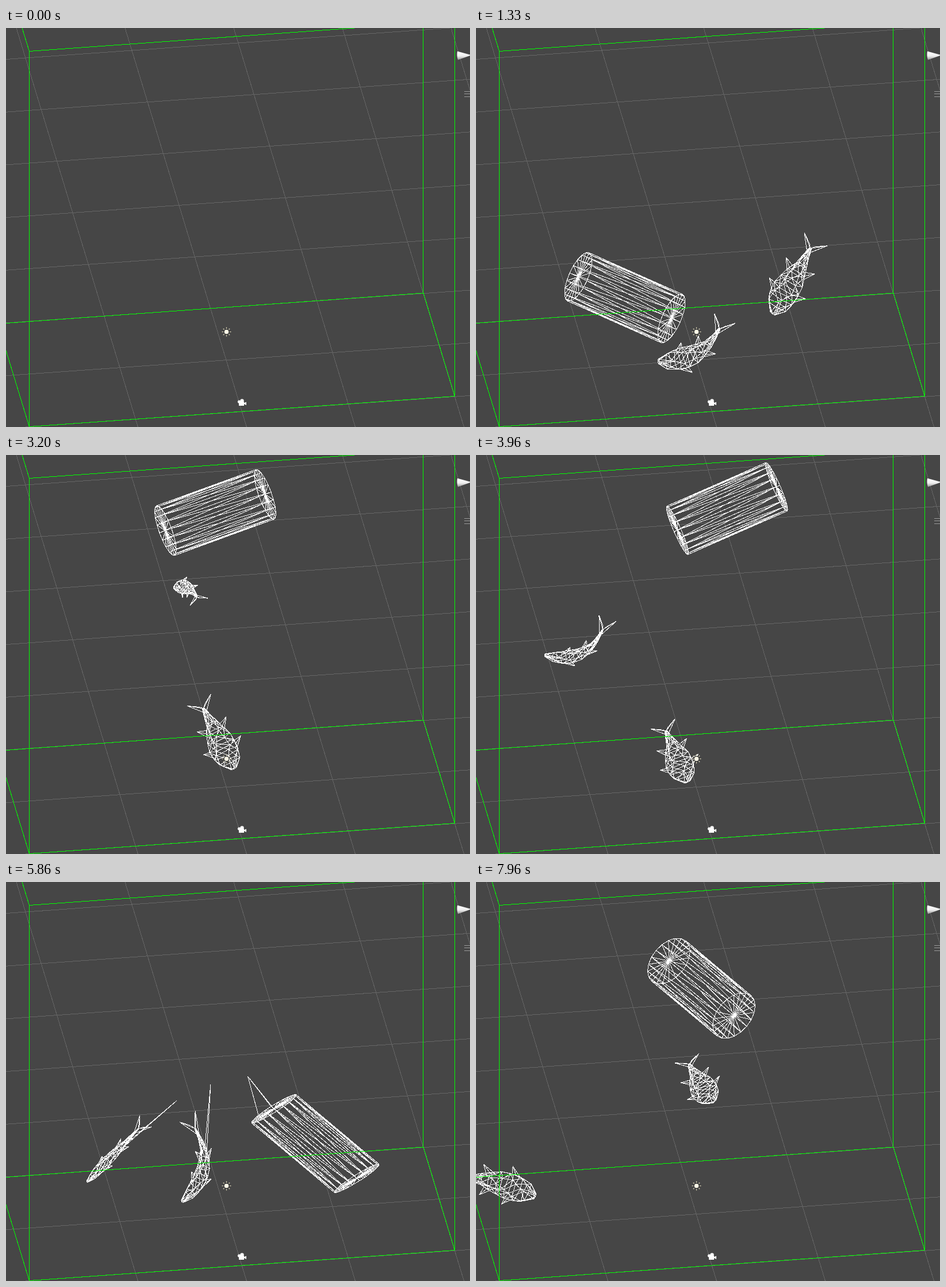
Write an HTML page that moves like this. It is 807 px wide and 694 px high and loops after 8000 ms.

```html
<!DOCTYPE html>
<html lang="en">
<head>
<meta charset="utf-8">
<title>Wireframe box</title>
<style>
html, body { margin: 0; width: 100%; height: 100%; overflow: hidden; background: #464646; }
svg { display: block; width: 100vw; height: 100vh; }
.lines { fill: none; stroke-width: 1; shape-rendering: crispEdges; }
</style>
</head>
<body>
<svg viewBox="0 0 807 694">
  <defs>
    <linearGradient id="cone" x2="0" y2="1">
      <stop offset="0" stop-color="#fff"/><stop offset=".55" stop-color="#eee"/><stop offset="1" stop-color="#999"/>
    </linearGradient>
  </defs>
  <path id="grid" class="lines" stroke="#656565"/>
  <path id="mesh" class="lines" stroke="#fff"/>
  <path class="lines" stroke="#0f0" d="M28 0L40.5 40.5L606 0M40.5 40V693M725.5 0V461M780.5 0V641M0 513.5L726 461L780.5 640.5L40.5 693.5L0 561"/>
  <g transform="translate(383.5 528.5)">
    <circle r="5" fill="#333"/><circle r="3.8" fill="#fffbe6"/>
    <path id="rays" stroke="#e6e0c0" stroke-width="1.2"/>
  </g>
  <path fill="#fff" d="M405 650H414V652L418 650.5V656L414 654V657H405Z"/>
  <g fill="#fff"><circle cx="410.5" cy="648.5" r="3.2"/><circle cx="405.5" cy="650" r="2.6"/></g>
  <path fill="url(#cone)" d="M785 40.5L807 46.5V48L786 55.5Q783.5 48 785 40.5Z"/>
  <path class="lines" stroke="#999" d="M797 110.5H807M797 114.5H807M797 119.5H807"/>
</svg>
<script>
const LOOP = 8000, APPEAR = 60, START = 240, STEP = 63.28;
const TURNS = [26, 47, 70, 89, 102, 122];  // steps at which the bodies change course
const BOUNCE = .35, SWIM_PERIOD = 24, SWIM_PEAK = 17;

// path: x, y, turn, tilt away from the viewer, roll; the first y is the height of release
const drum = {
  draw: drawDrum, floor: 532, stray: [84, 108], reach: -165,
  path: [[259, 296, 24, 21], [364, 100, -20, 14], [503, 87, -27, 2.5],
         [538, 455, 40, 8], [234, 465, 91, 15], [392, 185, 40, 39]]
};
const fishA = {
  draw: drawFish, floor: 563, stray: [84, 108], reach: 145, phase: 0,
  path: [[370, 442, -28, 25, 40], [370, 493, -117, 28, 0], [330, 553, -109, 58, 15],
         [317, 492, -80, 14, 60], [728, 126, -243, 7, -40], [38, 531, -166, 0, -20]]
};
const fishB = {
  draw: drawFish, floor: 545, stray: [84, 95], reach: 145, phase: .25,
  path: [[549, 267, -60, 10, 0], [312, 240, 22, 71, -60], [40, 403, -66, 0, -65],
         [186, 475, -46, 15, -70], [411, 273, 71, 37, -46], [393, 349, 236, 54, -15]]
};

const TAU = 2 * Math.PI;
const dir = degrees => [Math.cos(degrees * TAU / 360), Math.sin(degrees * TAU / 360)];
const byId = id => document.getElementById(id);
const loop = (n, f) => Array.from({ length: n }, (_, i) => f(i));
const line = (p, q) => `M${p[0].toFixed(1)} ${p[1].toFixed(1)}L${q[0].toFixed(1)} ${q[1].toFixed(1)}`;
const jitter = seed => Math.sin(seed * 12.9898) * 43758.5453 % 1;

// Free fall in steps, then one damped bounce.
function fall(start, floor, k) {
  const time = k + 1.6, impact = Math.sqrt(2 * (floor - start));
  if (time < impact) return start + time * time / 2;
  const after = time - impact;
  return floor - Math.max(0, BOUNCE * impact * after - after * after / 2);
}

function pose({ path, floor }, k) {
  const first = [...path[0]];
  first[1] = fall(first[1], floor, Math.min(k, TURNS[0]));
  const points = [first, ...path.slice(1)];
  let i = 1;
  while (i < TURNS.length - 1 && TURNS[i] < k) i++;
  const u = Math.min(1, Math.max(0, (k - TURNS[i - 1]) / (TURNS[i] - TURNS[i - 1])));
  return points[i].map((end, n) => points[i - 1][n] + (end - points[i - 1][n]) * u);
}

// Maps (along, across) in the body's own axes to the stage.
function bodyFrame(x, y, turn) {
  const [c, s] = dir(turn);
  return (along, across) => [x + along * c - across * s, y + along * s + across * c];
}

// A vertex torn out of the mesh, sliding sideways with time.
function strayTip({ stray, reach }, place, k) {
  if (k < stray[0] || k > stray[1]) return null;
  return place(reach, Math.sign(reach) * 7 * (k - 87));
}

function drawDrum(body, k) {
  const SIDES = 20, RADIUS = 46, LENGTH = 190;
  const [x, y, turn, tilt] = pose(body, k);
  const place = bodyFrame(x, y, turn), tip = strayTip(body, place, k);
  const [flat, deep] = dir(tilt);
  const [lean, across] = dir(-90 + (tip ? 2.2 * (97 - k) : 0));
  const ends = [-LENGTH / 2 * flat, LENGTH / 2 * flat];
  const centres = ends.map(end => place(end, 0));
  const caps = ends.map(end => loop(SIDES, i => {
    const [c, s] = dir(i * 360 / SIDES);
    return place(end + RADIUS * (c * lean + s * deep), RADIUS * c * across);
  }));
  let d = '';
  for (let i = 0; i < SIDES; i++) {
    const next = (i + 1) % SIDES;
    caps.forEach((cap, e) => d += line(cap[i], cap[next]) + line(centres[e], cap[i]));
    d += line(caps[0][i], caps[1][i]) + line(caps[0][i], caps[1][next]);
  }
  if (tip) {
    const distance = p => Math.hypot(p[0] - tip[0], p[1] - tip[1]);
    const nearest = [...caps[0]].sort((p, q) => distance(p) - distance(q));
    d += line(tip, nearest[0]) + line(tip, nearest[3]) + line(tip, centres[0]);
  }
  return d;
}

function drawFish(body, k) {
  const RINGS = 9, SIDES = 6, LENGTH = 135, WIDTH = 26, FLEX = 32;
  const [x, y, turn, tilt, roll] = pose(body, k);
  const place = bodyFrame(x, y, turn), tip = strayTip(body, place, k);
  const flat = dir(tilt)[0], [open, edge] = dir(roll);
  const length = LENGTH * flat, width = WIDTH * open;
  const swim = Math.cos(((k - SWIM_PEAK) / SWIM_PERIOD - body.phase) * TAU);
  const bend = FLEX * edge * flat * swim;
  const point = (s, side) => {
    const slope = Math.atan2(4 * bend * (1 - 2 * s), length);
    return place((s - .5) * length - side * Math.sin(slope),
                 4 * s * (1 - s) * bend + side * Math.cos(slope));
  };
  const girth = s => width * (.08 + .92 * Math.sin(Math.PI * s ** .57) ** 1.3);
  const rings = loop(RINGS, i => loop(SIDES, j => {
    const s = .01 + .98 * i / (RINGS - 1), seed = i * SIDES + j + 1;
    const [c, n] = dir((j + i * .5 + .25 + .35 * jitter(seed)) * 360 / SIDES);
    return point(s + n * girth(s) / width * .04, c * girth(s));
  }));
  let d = '';
  rings.forEach((ring, i) => ring.forEach((p, j) => {
    const next = rings[i + 1];
    d += line(p, ring[(j + 1) % SIDES]);
    if (next) d += line(p, next[j]) + line(p, next[(j + SIDES - 1) % SIDES]);
  }));
  const fan = (roots, end) => roots.map(root => line(root, end)).join('');
  const fin = (s, sweep, reach) => fan([0, .05, .1].map(at =>
    point(s + at, Math.sign(reach) * girth(s + at) * .85)), point(s + sweep, reach * width));
  for (const side of [-1, 1]) {
    const spread = side * (10 + width / 2);
    const notch = point(1.04, spread * .25);
    d += fin(.27, .12, side * 1.4) + fin(.58, .15, side * 1.1);
    d += fan([point(.93, side * 2), point(.99, 0), notch], point(1.13, spread));
    d += line(point(.99, 0), notch);
  }
  if (tip) d += fan([point(.72, girth(.72)), point(.78, girth(.78))], tip);
  return d;
}

byId('grid').setAttribute('d',
  loop(8, i => line([0, 54.5 + 91.7 * i], [807, -2.5 + 91.7 * i])).join('') +
  loop(5, i => line([18 + 189 * i, 0], [229.5 + 189 * i, 694])).join(''));
byId('rays').setAttribute('d', loop(8, i => {
  const [c, s] = dir(i * 45);
  return line([c * 5.6, s * 5.6], [c * 8, s * 8]);
}).join(''));

const mesh = byId('mesh'), begin = performance.now();
let shown = null;
function frame() {
  const t = (performance.now() - begin) % LOOP;
  const k = t < APPEAR ? -1 : Math.max(0, Math.round((t - START) / STEP));
  if (k !== shown) {
    shown = k;
    mesh.setAttribute('d', k < 0 ? '' : [drum, fishA, fishB].map(b => b.draw(b, k)).join(''));
  }
  requestAnimationFrame(frame);
}
frame();
</script>
</body>
</html>
```
